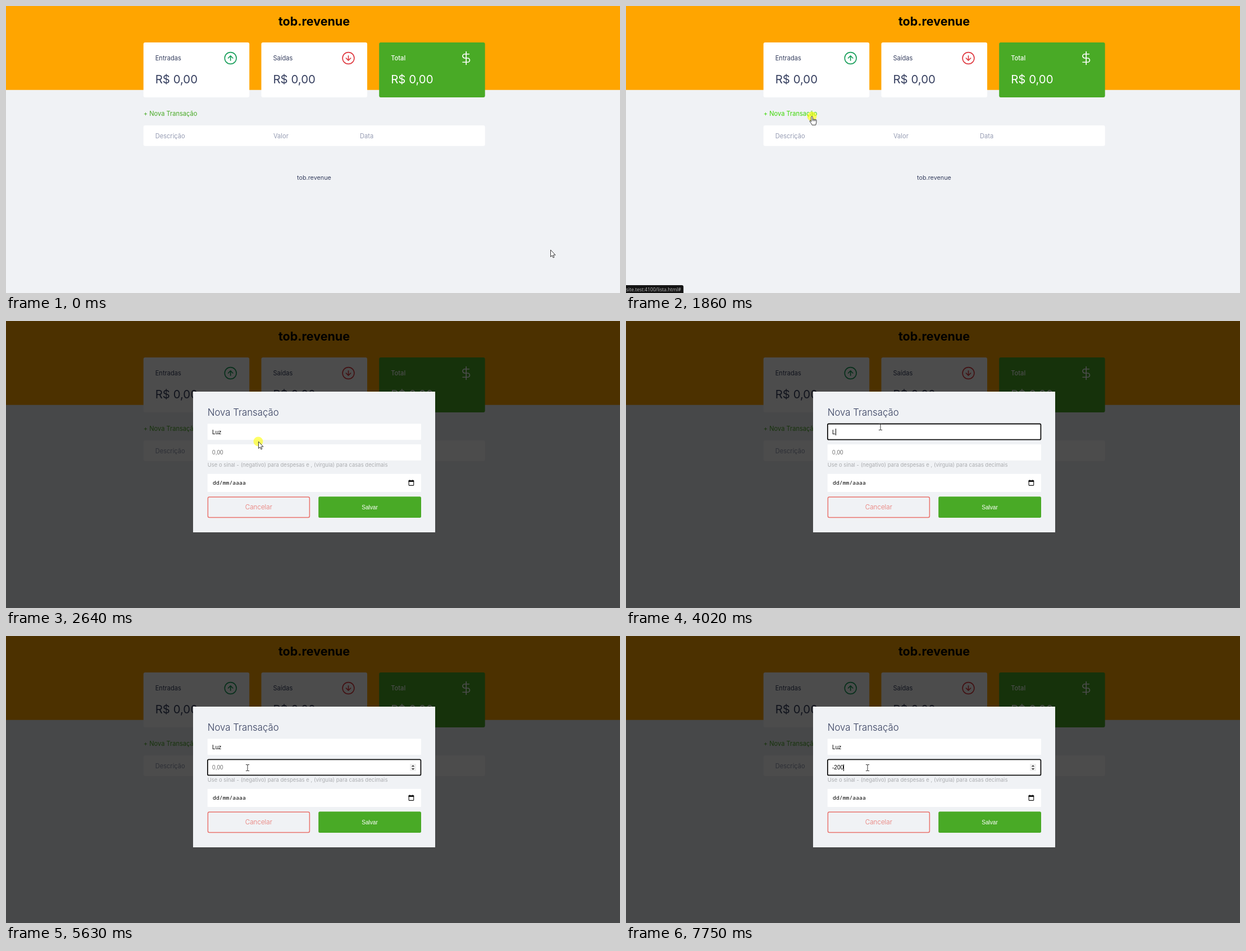
These frames come from a looping animation (1093 by 512 pixels, 7.99 s). An HTML page with a canvas:

```html
<!DOCTYPE html>
<html lang="pt-BR">
<head>
<meta charset="utf-8">
<title>Nova Transação</title>
<style>
  html, body { margin: 0; width: 100%; height: 100%; overflow: hidden; background: #f0f2f5; }
  canvas { display: block; }
</style>
</head>
<body>
<canvas id="stage" width="1093" height="512"></canvas>
<script>
const ctx = document.getElementById('stage').getContext('2d');
const LOOP = 7990;
const BRAND = 'tob.revenue';
const UI = 'Inter, sans-serif';
const FORM = '"Liberation Sans", Arial, sans-serif';
const INK = '#363f5f', GREEN = '#49aa26', RED = '#e9736d', PAGE = '#f0f2f5';

// Pointer: time, x, y, shape. Each pose holds until the next.
const POINTER = [
  [0, 969, 435, 'arrow'], [70, 812, 374, 'arrow'], [140, 545, 247, 'arrow'], [210, 404, 177, 'arrow'],
  [360, 384, 184, 'arrow'], [445, 350, 195, 'hand'], [530, 340, 197, 'hand'], [770, 339, 197, 'hand'],
  [1370, 337, 197, 'hand'], [1450, 335, 197, 'hand'], [1520, 333, 197, 'hand'], [1600, 331, 197, 'hand'],
  [2150, 335, 199, 'arrow'], [2220, 350, 202, 'arrow'], [2290, 375, 206, 'ibeam'], [2360, 401, 209, 'ibeam'],
  [2430, 423, 212, 'arrow'], [2500, 438, 214, 'arrow'], [2570, 446, 215, 'arrow'], [2640, 449, 215, 'arrow'],
  [2700, 452, 213, 'arrow'], [2780, 453, 198, 'ibeam'], [2860, 453, 189, 'ibeam'],
  [4790, 451, 197, 'ibeam'], [4860, 445, 224, 'ibeam'], [4940, 437, 245, 'ibeam'],
  [5020, 431, 240, 'ibeam'], [5100, 430, 235, 'ibeam']
];
const CLICKS = [[1860, 2000], [2640, 2700], [2930, 3090], [5100, 5250]];
const DESCRIPTION = [[0, 'Luz'], [4020, 'L'], [4170, 'Lu'], [4480, 'Luz']];
const AMOUNT = [[0, ''], [6330, '-'], [7350, '-2'], [7530, '-20'], [7750, '-200']];
const DESCRIPTION_CARET = [[2930, 3010], [4020, 5010]];
const AMOUNT_CARET = [[5100, 5630], [6190, 6880], [7350, LOOP]];

const latest = (steps, t) => steps.filter(step => step[0] <= t).pop();
const within = (spans, t) => spans.some(([from, to]) => t >= from && t < to);

function box(x, y, w, h, fill, radius = 0) {
  ctx.fillStyle = fill;
  ctx.beginPath();
  ctx.roundRect(x, y, w, h, radius);
  ctx.fill();
}

function frame(x, y, w, h, color, width, radius) {
  ctx.strokeStyle = color;
  ctx.lineWidth = width;
  ctx.beginPath();
  ctx.roundRect(x, y, w, h, radius);
  ctx.stroke();
}

function text(str, x, y, size, color, { weight = 400, family = UI, align = 'left' } = {}) {
  ctx.font = `${weight} ${size}px ${family}`;
  ctx.textAlign = align;
  ctx.fillStyle = color;
  ctx.fillText(str, x, y);
}

function shape(path, x, y, { fill, stroke, width = 1, scale = 1 }) {
  ctx.save();
  ctx.translate(x, y);
  ctx.scale(scale, scale);
  ctx.lineCap = ctx.lineJoin = 'round';
  ctx.lineWidth = width;
  const outline = new Path2D(path);
  if (fill) { ctx.fillStyle = fill; ctx.fill(outline); }
  if (stroke) { ctx.strokeStyle = stroke; ctx.stroke(outline); }
  ctx.restore();
}

const RING = 'M10 0A10 10 0 1 1 -10 0A10 10 0 1 1 10 0';
const ICONS = {
  up: RING + 'M4 0L0 -4L-4 0M0 4V-4',
  down: RING + 'M-4 0L0 4L4 0M0 -4V4',
  dollar: 'M0 -11V11M5 -7H-2.5A3.5 3.5 0 0 0 -2.5 0H2.5A3.5 3.5 0 0 1 2.5 7H-6'
};

function card(x, label, icon, iconColor, fill = '#fff', ink = INK) {
  box(x, 65, 188.5, 98, fill, 3);
  text(label, x + 21, 97, 11.1, ink, { weight: ink === INK ? 400 : 500 });
  text('R$ 0,00', x + 21, 138, 20.4, ink);
  shape(ICONS[icon], x + 155, 93, { stroke: iconColor, width: 1.6, scale: 1.04 });
}

function drawPage(hover) {
  box(0, 0, 1093, 512, PAGE);
  box(0, 0, 1093, 149.7, '#ffa500');
  text(BRAND, 548.5, 34.5, 21.5, '#000', { weight: 700, align: 'center' });
  card(244.7, 'Entradas', 'up', '#1a9f5c');
  card(454.5, 'Saídas', 'down', '#df3b42');
  card(664.2, 'Total', 'dollar', '#fff', GREEN, '#fff');
  text('+ Nova Transação', 244.7, 196, 11.1, hover ? '#3dd705' : GREEN);
  box(244.7, 213, 608, 36.7, '#fff', 3);
  ['Descrição', 'Valor', 'Data'].forEach((name, i) =>
    text(name, [265.7, 476, 630][i], 235.5, 11.1, '#969cb3'));
  text(BRAND, 548.5, 309.5, 10.8, INK, { align: 'center' });
}

function field(y, h, focused) {
  box(358.7, y, 380.3, h, '#fff', 1);
  if (focused) frame(358.9, y + .3, 379.5, h - .6, '#101010', 1.8, 2);
}

function caretAfter(str, y) {
  ctx.font = `400 10.13px ${FORM}`;
  const x = Math.round(367 + ctx.measureText(str).width);
  box(x, y, 1, 12, '#000');
}

function drawModal(t) {
  box(0, 0, 1093, 512, 'rgba(0,0,0,.7)');
  box(333, 126, 431, 251, PAGE);
  text('Nova Transação', 358.7, 169, 16.8, INK, { weight: 300 });

  const description = latest(DESCRIPTION, t)[1];
  const selected = t >= 3010 && t < 4020;
  field(183.2, 28.8, t >= 2930 && t < 5100);
  if (selected) box(367, 192, 17, 12, '#0078d7');
  text(description, 367, 201.5, 10.13, selected ? '#fff' : '#000', { family: FORM });
  if (within(DESCRIPTION_CARET, t)) caretAfter(description, 192);

  const amount = latest(AMOUNT, t)[1];
  field(220, 28.7, t >= 5100);
  text(amount || '0,00', 367, 238.2, 10.13, amount ? '#000' : '#757575', { family: FORM });
  if (within(AMOUNT_CARET, t)) caretAfter(amount, 229);
  if (t >= 4860) {
    box(719, 228, 11, 13, '#efefef');
    shape('M-2.7 -1.4L0 -4.2L2.7 -1.4ZM-2.7 1.6L0 4.4L2.7 1.6Z', 724.5, 234.5, { fill: '#404040' });
  }

  text('Use o sinal - (negativo) para despesas e , (virgula) para casas decimais',
    358.7, 260.3, 9.5, '#abadb0');

  field(272.7, 32.3, false);
  text('dd/mm/aaaa', 368, 292, 9.8, '#000', { family: '"Noto Sans Mono", monospace' });
  frame(717.1, 284.8, 8.6, 8.6, '#111', 1.1, .8);
  box(716.6, 284.3, 9.6, 2.7, '#111');
  box(718.2, 283.2, 1.2, 2, '#111');
  box(723.4, 283.2, 1.2, 2, '#111');

  frame(359.4, 314, 181, 36.4, RED, 1.5, 2.5);
  text('Cancelar', 449.8, 336.2, 11.6, RED, { weight: 300, align: 'center' });
  box(556.2, 313.3, 182.8, 37.8, GREEN, 2.5);
  text('Salvar', 647.5, 335.8, 10.13, '#fff', { family: FORM, align: 'center' });
}

function drawStatus() {
  box(0, 498, 102.3, 14, '#151515', [0, 3, 0, 0]);
  text('site.test:4100/lista.html#', 0, 508.5, 8.5, '#b5b5b5', { family: '"Open Sans", sans-serif' });
}

const CURSORS = {
  arrow: ['M.5 .5V12.4L3.2 9.9L5 14L6.9 13.2L5.1 9.2H8.6Z', '#fff', '#222', .9],
  hand: ['M-1.3 9V1.3a1.3 1.3 0 0 1 2.6 0V5.6a1.2 1.2 0 0 1 2.3 .2a1.2 1.2 0 0 1 2.2 .4' +
    'a1.1 1.1 0 0 1 2.1 .6V10.5c0 2 -1.2 3 -1.2 4.8H.2C-.4 13 -2.6 11 -3.8 8.9c-.7 -1.3 .8 -2.3 1.6 -1.2Z' +
    'M1.3 5.6V8M3.6 5.8V8M5.8 6.2V8', '#fff', '#222', .9],
  ibeam: ['M-2.7 -5.5H-.9L0 -4.8L.9 -5.5H2.7M0 -4.8V4.8M-2.7 5.5H-.9L0 4.8L.9 5.5H2.7', null, '#333', 1]
};

function drawPointer(t) {
  const [, x, y, kind] = latest(POINTER, t);
  if (within(CLICKS, t)) box(x - 8.5, y - 8.5, 17, 17, 'rgba(255,255,0,.6)', 8.5);
  const [path, fill, stroke, width] = CURSORS[kind];
  shape(path, x, y, { fill, stroke, width });
}

function draw() {
  const t = performance.now() % LOOP;
  drawPage(t >= 445 && t < 2000);
  if (t >= 2000) drawModal(t);
  if (t >= 680 && t < 2220) drawStatus();
  drawPointer(t);
  requestAnimationFrame(draw);
}
draw();
</script>
</body>
</html>
```
